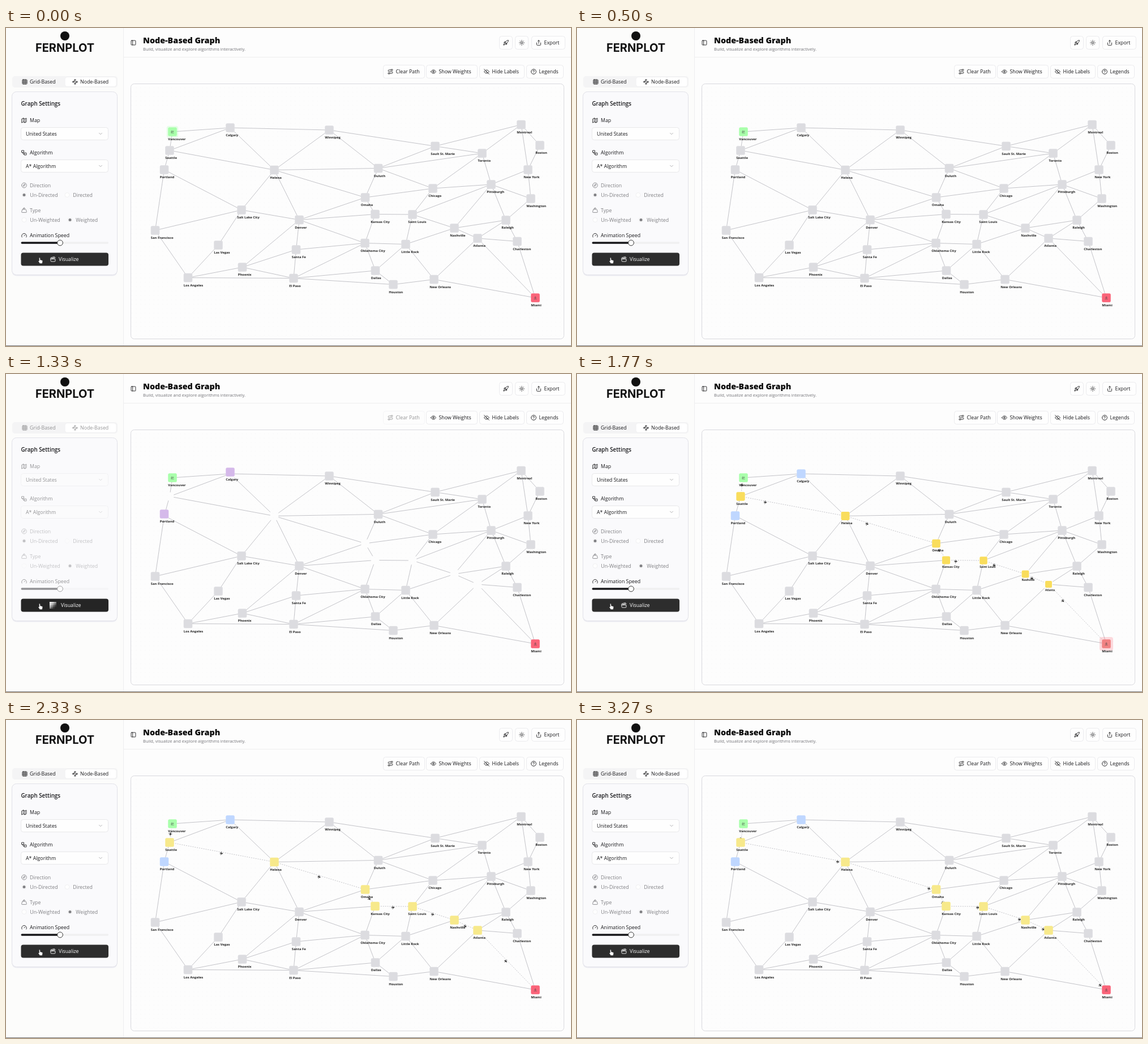
Write an HTML page that moves like this. It is 998 by 561 pixels and loops after 3.3 s.

```html
<!DOCTYPE html>
<html lang="en">
<head>
<meta charset="utf-8">
<title>Node-Based Graph</title>
<style>
html, body { margin: 0; width: 100%; height: 100%; overflow: hidden; background: #fdfdfd; }
svg { display: block; }
text { font-family: "Open Sans", "Noto Sans", sans-serif; white-space: pre; }
.icon { fill: none; stroke-linecap: round; stroke-linejoin: round; stroke-width: 2; }
.busy .lock { opacity: .45; }
.busy .idle, svg:not(.busy) .working { display: none; }
.busy .go { fill: #252525; }
.dashed { stroke-dasharray: 1.95 1.95; }
</style>
</head>
<body>
<svg id="stage" width="998" height="561" viewBox="0 0 998 561"></svg>
<script>
const LOOP = 3300, BUSY_FROM = 900, SOLVED = 1300, BUSY_TO = 1400, FLIGHT_START = 1325;
const NODE = 15.5, INK = '#18181b', MUTED = '#808084';
const stage = document.getElementById('stage');

const ring = (x, y, r) => `M${x - r} ${y}a${r} ${r} 0 1 0 ${2 * r} 0a${r} ${r} 0 1 0 ${-2 * r} 0`;
const ICONS = {
  grid: 'M5 3h14q2 0 2 2v14q0 2-2 2H5q-2 0-2-2V5q0-2 2-2zM3 9h18M3 15h18M9 3v18M15 3v18',
  nodes: ring(12, 4.5, 2.5) + ring(4.5, 12, 2.5) + ring(19.5, 12, 2.5) + ring(12, 19.5, 2.5) +
    'M10.2 6.3 6.3 10.2M7 12h10M13.8 17.7l3.9-3.9',
  map: 'M3 6l6-3 6 3 6-3v15l-6 3-6-3-6 3zM9 3v15M15 6v15',
  flow: 'M3 3h8v8H3zM13 13h8v8h-8zM7 11v4q0 2 2 2h4',
  compass: ring(12, 12, 10) + 'M16 8l-2 6-6 2 2-6z',
  weight: ring(12, 5, 3) + 'M6.5 8h11q1.500 0 2 1.500l2.400 9q.5 2.500-2 2.500H4q-2.500 0-2-2.500l2.500-9Q5 8 6.500 8z',
  gauge: 'M12 14l4-4M3.300 19a10 10 0 1 1 17.400 0',
  clapper: 'M20.200 6 3 11l-.9-2.400q-.4-2 1.300-2.500l13.500-4q2-.4 2.500 1.300zM6.200 5.300l3.100 3.900M12.400 3.400l3.100 4M3 11h18v8q0 2-2 2H5q-2 0-2-2z',
  route: ring(6, 19, 3) + ring(18, 5, 3) + 'M9 19h8.500a3.500 3.500 0 0 0 0-7h-11a3.500 3.500 0 0 1 0-7H15',
  eye: 'M2 12s3.500-7 10-7 10 7 10 7-3.500 7-10 7-10-7-10-7z' + ring(12, 12, 3),
  eyeOff: 'M10 5q8-1 12 7-1 2-2.500 3.400M6.600 6.600Q3.500 8.500 2 12q5 10 15.400 5.400M2 2l20 20M14 14a3 3 0 0 1-4-4',
  help: ring(12, 12, 10) + 'M9 9a3 3 0 0 1 6 1c0 2-3 3-3 3M12 17h.01',
  rocket: 'M4.500 16.500q-2 2-2 5 3 0 5-2a2 2 0 0 0-3-3zM12 15l-3-3Q13 2 22 2q0 9-10 13zM9 12H4q1-6 7-4M12 15v5q6-1 4-7',
  sun: ring(12, 12, 4) + 'M12 2v2M12 20v2M5 5l1.400 1.400M17.600 17.600 19 19M2 12h2M20 12h2M5 19l1.400-1.400M17.600 6.400 19 5',
  share: 'M4 12v8q0 2 2 2h12q2 0 2-2v-8M16 6l-4-4-4 4M12 2v13',
  panel: 'M5 3h14q2 0 2 2v14q0 2-2 2H5q-2 0-2-2V5q0-2 2-2zM9 3v18',
  chevron: 'M6 9l6 6 6-6',
  takeoff: 'M3 21h18M4 16l-2-4 3 .5 3-1L5 6l3-1 6 4 6-2q2 1 0 3L7 16z',
  landing: 'M3 21h18M12 3v12M6 10l6-3 6 3M8 16h8'
};
const PLANE = 'M3 0 .8 .7-.8 3h-.7L.1 .7-1.700 .6l-.6 .9h-.5L-2.400 0l-.4-1.500h.5l.6 .9L.1-.7-1.500-3h.7L.8-.7z';

const text = (x, y, str, size = 8.8, weight = 500, fill = INK, extra = '') =>
  `<text x="${x}" y="${y}" font-size="${size}" font-weight="${weight}" fill="${fill}" ${extra}>${str}</text>`;
const icon = (name, x, y, size = 10.5, color = INK) =>
  `<path class="icon" d="${ICONS[name]}" stroke="${color}" transform="translate(${x} ${y}) scale(${size / 24}) translate(-12 -12)"/>`;
const box = (x, y, w, h, r, fill = '#fff', stroke = 'none', extra = '') =>
  `<rect x="${x}" y="${y}" width="${w}" height="${h}" rx="${r}" fill="${fill}" stroke="${stroke}" ${extra}/>`;
const dot = (x, y, r, fill, stroke = 'none') => `<circle cx="${x}" cy="${y}" r="${r}" fill="${fill}" stroke="${stroke}"/>`;
const lock = markup => `<g class="lock">${markup}</g>`;
const button = (x, y, w, name, label) =>
  box(x + .5, y + .5, w - 1, 23, 4, '#fefefe', '#ebebee') +
  icon(name, label ? x + 13 : x + w / 2, y + 12) + (label ? text(x + 22.5, y + 15.2, label) : '');
const field = (name, y, label, value) => lock(
  icon(name, 32, y) + text(42, y + 3.2, label) +
  box(26.5, y + 12.5, 154, 22, 4, '#fefefe', '#e8e8ea') +
  text(35, y + 26.8, value, 8.8, 400) + icon('chevron', 167, y + 23.5, 10, '#a5a5a8'));
const radios = (name, y, label, first, second, x2, chosen) => lock(
  icon(name, 32, y, 10.5, MUTED) + text(42, y + 3.2, label, 8.8, 400, MUTED) +
  [[32, first], [x2, second]].map(([x, str], i) =>
    dot(x, y + 17, 4, '#fefefe', '#f1f1f2') + (i === chosen ? dot(x, y + 17, 2.5, MUTED) : '') +
    text(x + 10.3, y + 20.2, str, 8.8, 400, MUTED)).join(''));

// name: [x, y, neighbours]
const cities = {
  'Vancouver': [294, 183, 'Calgary,Seattle'],
  'Seattle': [289, 216, 'Calgary,Portland,Helena'],
  'Calgary': [396, 176, 'Winnipeg,Helena'],
  'Portland': [279.5, 250, 'Salt Lake City,San Francisco'],
  'Helena': [474, 250.5, 'Duluth,Omaha,Denver,Salt Lake City'],
  'Omaha': [634.5, 299, 'Chicago,Kansas City'],
  'Kansas City': [652, 328.5, 'Oklahoma City,Saint Louis'],
  'Saint Louis': [718, 329, 'Chicago,Pittsburgh,Nashville,Little Rock'],
  'Nashville': [792, 353, 'Pittsburgh,Raleigh,Atlanta,Little Rock'],
  'Atlanta': [833, 371, 'Miami'],
  'Miami': [935, 476, ''],
  'Winnipeg': [571, 180, 'Helena,Duluth,Sault St. Marie'],
  'Duluth': [657.5, 247.5, 'Toronto,Chicago,Omaha'],
  'Sault St. Marie': [758, 208.5, 'Toronto,Duluth'],
  'Montreal': [910, 170.5, 'Toronto,Sault St. Marie'],
  'Boston': [943, 207, 'Montreal'],
  'Toronto': [841, 221, 'Pittsburgh'],
  'New York': [922, 250, 'Pittsburgh,Boston,Montreal'],
  'Chicago': [754, 283, 'Toronto,Pittsburgh'],
  'Pittsburgh': [857, 276, ''],
  'Washington': [927, 301, 'Pittsburgh,New York'],
  'Raleigh': [883, 339, 'Atlanta,Pittsburgh,Washington'],
  'Charleston': [903, 376.5, 'Miami,Atlanta,Raleigh'],
  'Salt Lake City': [416, 321, 'Denver,Las Vegas'],
  'San Francisco': [263.5, 357, 'Salt Lake City,Los Angeles'],
  'Las Vegas': [375, 383, 'Los Angeles'],
  'Los Angeles': [321.5, 440.5, 'Phoenix,El Paso'],
  'Phoenix': [417.5, 422, 'Denver,Santa Fe,El Paso'],
  'Denver': [518, 338.5, 'Santa Fe,Omaha,Kansas City,Oklahoma City'],
  'Santa Fe': [512.5, 391, 'El Paso,Oklahoma City'],
  'El Paso': [508, 441.5, 'Oklahoma City,Dallas,Houston'],
  'Oklahoma City': [634, 379.5, 'Little Rock'],
  'Little Rock': [706, 381.5, ''],
  'Dallas': [652.5, 428, 'Oklahoma City,Houston,Little Rock'],
  'Houston': [684, 452.5, 'New Orleans'],
  'New Orleans': [756, 443.5, 'Little Rock,Atlanta,Miami']
};
const route = 'Vancouver,Seattle,Helena,Omaha,Kansas City,Saint Louis,Nashville,Atlanta,Miami'.split(',');
const visited = ['Seattle', 'Calgary', 'Portland', ...route.slice(2, -1)];
const names = Object.keys(cities);

// Both ends of an edge, cut where it meets the square nodes
function span(from, to) {
  const [ax, ay] = cities[from], [bx, by] = cities[to];
  const dx = bx - ax, dy = by - ay, cut = 7.25 / Math.max(Math.abs(dx), Math.abs(dy));
  return { x: ax + dx * cut, y: ay + dy * cut, dx: dx * (1 - 2 * cut), dy: dy * (1 - 2 * cut) };
}
const edges = names.flatMap(from => cities[from][2].split(',').filter(Boolean).map(to => {
  const { x, y, dx, dy } = span(from, to);
  const onRoute = route.includes(from) && route[route.indexOf(from) + 1] === to;
  return `<path ${onRoute ? 'class="leg"' : ''} d="M${x} ${y}l${dx} ${dy}"/>`;
})).join('');
const nodeMarkup = name => {
  const badge = { Vancouver: 'takeoff', Miami: 'landing' }[name];
  return `<g class="node">${badge ? box(0, 0, 0, 0, 4, '', 'none', 'class="halo"') : ''}` +
    box(-NODE / 2, -NODE / 2, NODE, NODE, 2.5, '#dcdce0', 'none', 'class="tile"') +
    (badge ? icon(badge, 0, 0, 6, '#444') : '') + text(-7.8, 15, name, 5.9, 700, '#222') + '</g>';
};
const loaderCells = Array.from({ length: 16 }, (_, i) =>
  box(77 + i % 4 * 3, 402 + (i >> 2) * 3, 2.8, 2.8, 0, '#fff', 'none', 'class="cell"')).join('');

stage.innerHTML = `
<defs><pattern id="dots" width="7.8" height="7.8" patternUnits="userSpaceOnUse">${dot(3.9, 3.9, .45, '#e6e6ea')}</pattern></defs>
${box(0, 0, 998, 561, 0, '#fdfdfd')}${box(0, 0, 207, 561, 0, '#fcfcfb')}
<path d="M207.500 0V561M208 51.500H998" stroke="#eeeeef"/>
${dot(104, 14, 8, '#111')}
${text(104, 42, 'FERNPLOT', 20, 700, '#111', 'text-anchor="middle" style="font-family:Inter,sans-serif"')}
${box(11, 85, 186, 20, 5, '#f4f4f5')}${box(104, 86.5, 91, 17, 4, '#fff', '#f0f0f1')}
${lock(icon('grid', 33, 95) + text(42, 98.2, 'Grid-Based') + icon('nodes', 122, 95) + text(131, 98.2, 'Node-Based'))}
${box(10.5, 114, 186, 323.500, 8, '#ededf2')}${box(10.5, 112.500, 186, 323, 8, '#fafafc', '#e1e1e8')}
${text(26.500, 137, 'Graph Settings', 9.8, 600)}
${field('map', 163, 'Map', 'United States')}
${field('flow', 220, 'Algorithm', 'A* Algorithm')}
${radios('compass', 277.500, 'Direction', 'Un-Directed', 'Directed', 108, 0)}
${radios('weight', 321.500, 'Type', 'Un-Weighted', 'Weighted', 113, 1)}
${lock(icon('gauge', 32, 366) + text(42, 369.2, 'Animation Speed') +
  box(26.500, 377.300, 154.500, 3.500, 1.750, '#f0f0f1') + box(26.500, 377.300, 66, 3.500, 1.750, INK) + dot(95.500, 379, 4.900, '#fff', '#333'))}
${box(26.500, 396.500, 154.500, 23, 4, '#2d2d2d', 'none', 'class="go"')}
<g class="idle">${icon('clapper', 83, 408, 10.5, '#fff') + text(93, 411.2, 'Visualize', 8.8, 500, '#fff')}</g>
<g class="working">${loaderCells + text(97, 411.2, 'Visualize', 8.8, 500, '#fff')}</g>
<path d="M58.300 405.500q1.300-1 1.900.4l.4 3.100 3.200.8q1.200.5.9 1.800l-.7 3.900h-4.300l-2.700-4q0-1.300 1.600-.5z" fill="#fff" stroke="#222" stroke-width=".5"/>
${icon('panel', 225, 26)}
${text(242, 26.700, 'Node-Based Graph', 14.300, 800, '#0a0a0a')}
${text(242, 39.500, 'Build, visualize and explore algorithms interactively.', 7.560, 400, '#737378')}
${button(871, 14, 24, 'rocket')}${button(899, 14, 24, 'sun')}${button(928, 14, 60, 'share', 'Export')}
${lock(button(666, 65, 74, 'route', 'Clear Path'))}${button(742, 65, 91, 'eye', 'Show Weights')}
${button(836, 65, 80, 'eyeOff', 'Hide Labels')}${button(919, 65, 66, 'help', 'Legends')}
${box(220.500, 98.500, 765, 450, 6, '#fdfdfd', '#d9d9de')}${box(221, 99, 764, 449, 6, 'url(#dots)')}
<g fill="none" stroke="#b4b4ba" stroke-width=".8">${edges}</g>
${route.slice(1).map(() => `<path class="plane" d="${PLANE}" fill="#111"/>`).join('')}
${names.map(nodeMarkup).join('')}
<path d="M0 560.500H998" stroke="#77777a"/>`;

const all = selector => [...stage.querySelectorAll(selector)];
const nodes = all('.node'), planes = all('.plane'), legs = all('.leg'), cells = all('.cell');
const clamp = v => Math.min(1, Math.max(0, v));
const easeOut = v => 1 - (1 - clamp(v)) ** 2;
const mix = (a, b, k) => `color-mix(in srgb, ${b} ${clamp(k) * 100}%, ${a})`;

function nodeState(name, t) {
  const step = route.indexOf(name), order = visited.indexOf(name);
  if (order < 0) return { scale: 1, lift: 0, fill: '#dcdce0' };
  if (step > 0 && t >= SOLVED) return {
    scale: easeOut((t - SOLVED - 30 * step) / 500), lift: 0,
    fill: mix('#f9dd5c', '#f7e98b', (t - 1770) / 500)
  };
  const pop = (t - BUSY_FROM - 50 - 20 * order) / 220;
  if (pop < 0) return { scale: 1, lift: 0, fill: '#dcdce0' };
  const settle = easeOut((t - SOLVED - 30) / 500);
  return { scale: easeOut(pop), lift: 3 * easeOut(pop) * (1 - settle), fill: mix('#d5b9ea', '#bfd7ff', settle) };
}

// Landmark glow, once a second
const glow = (t, peak) => {
  const phase = t / 1000 - peak;
  return Math.exp(-(((phase - Math.round(phase)) / .08) ** 2));
};

function drawNode(node, name, t) {
  const [x, y] = cities[name];
  const { scale, lift, fill } = nodeState(name, t);
  node.setAttribute('transform', `translate(${x} ${y - lift}) scale(${scale})`);
  const tile = node.querySelector('.tile'), halo = node.querySelector('.halo');
  tile.style.fill = fill;
  if (!halo) return;
  const start = name === 'Vancouver', g = glow(t, start ? 0 : .75);
  const color = start ? '#a9ffab' : '#fa6479', size = NODE + (start ? 5 : 9) * g;
  tile.style.fill = start ? color : mix(color, '#f08484', g);
  for (const side of ['width', 'height']) halo.setAttribute(side, size);
  for (const side of ['x', 'y']) halo.setAttribute(side, -size / 2);
  halo.style.cssText = `fill:${color};opacity:${.25 * g}`;
}

function draw(t) {
  stage.classList.toggle('busy', t >= BUSY_FROM && t < BUSY_TO);
  nodes.forEach((node, i) => drawNode(node, names[i], t));
  const flying = t > FLIGHT_START + 10, progress = clamp((t - FLIGHT_START) / 2000);
  planes.forEach((plane, i) => {
    const { x, y, dx, dy } = span(route[i], route[i + 1]);
    const angle = Math.atan2(dy, dx) * 180 / Math.PI;
    plane.style.display = flying ? '' : 'none';
    plane.setAttribute('transform', `translate(${x + dx * progress - 1.2} ${y + dy * progress + 2}) rotate(${angle})`);
  });
  legs.forEach(leg => {
    leg.classList.toggle('dashed', flying);
    leg.style.strokeDashoffset = -t / 500 * 3.9 % 3.9;
  });
  cells.forEach((cell, i) => {
    cell.style.opacity = .5 + .5 * Math.cos((t - 1330) / 120 + (i % 4 + (i >> 2)) * .5);
  });
}

// Thirty pictures a second, held for 30, 40 and 30 ms
function tick() {
  const t = performance.now() % LOOP, rest = t % 100;
  draw(t - rest + (rest < 30 ? 0 : rest < 70 ? 30 : 70));
  requestAnimationFrame(tick);
}
tick();
</script>
</body>
</html>
```
